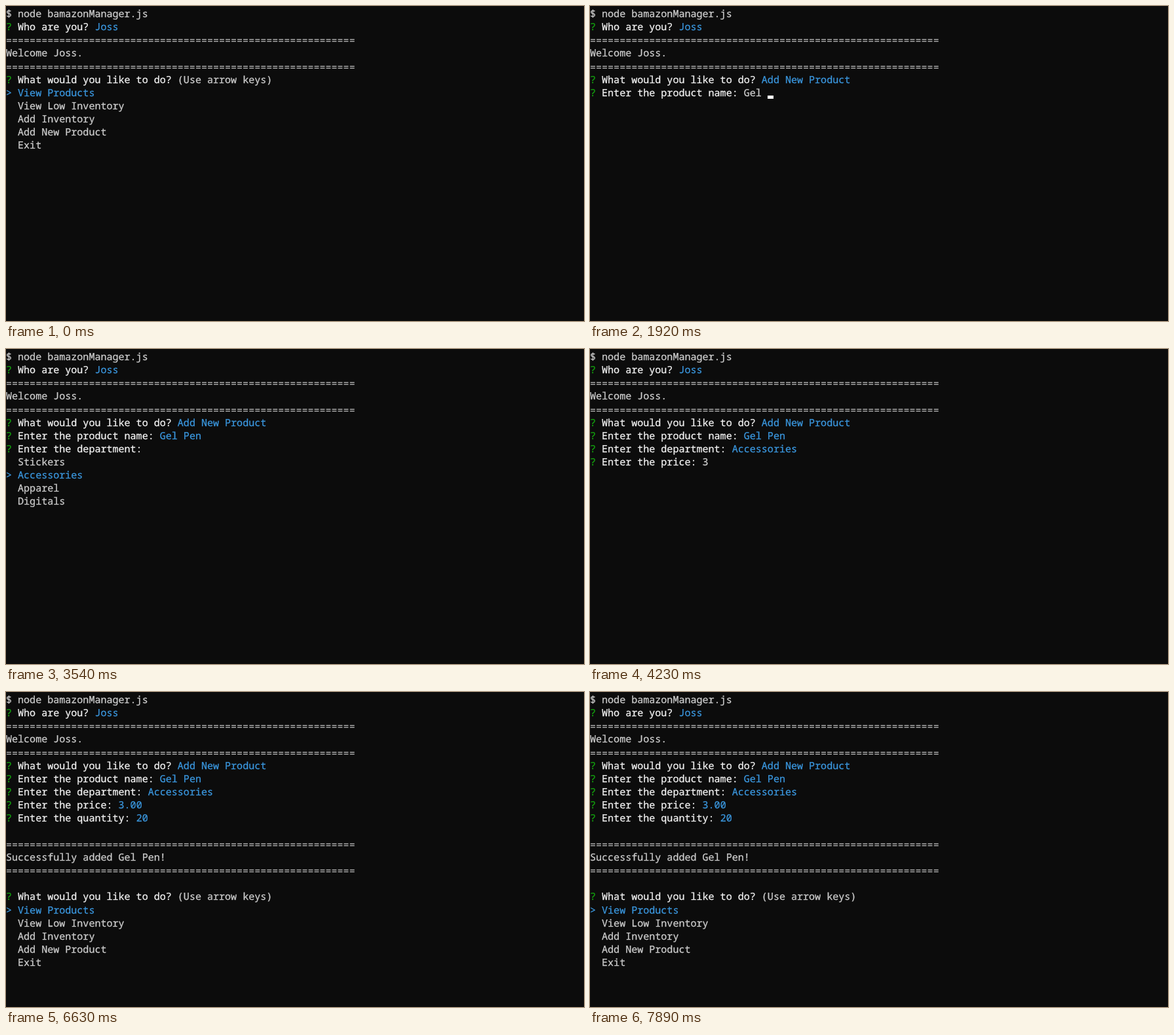
Write an HTML page that moves like this. It is 882 px wide and 482 px high and loops after 7920 ms.

```html
<!DOCTYPE html>
<html lang="en">
<head>
<meta charset="utf-8">
<title>Terminal product manager</title>
<style>
  html, body { margin: 0; width: 100%; height: 100%; overflow: hidden; background: #0c0c0c; }
  svg { display: block; }
  text {
    font: 15.05px "Noto Sans Mono", "DejaVu Sans Mono", monospace;
    text-rendering: geometricPrecision;
    white-space: pre;
  }
  tspan { fill: currentColor; stroke: currentColor; stroke-width: 0.3px; }
  .plain { color: #cccccc; }
  .rule { color: #cccccc; stroke: none; }
  .bold { color: #f2f2f2; }
  .mark { color: #13a10e; }
  .pick { color: #3a96dd; }
</style>
</head>
<body>
<svg id="screen" width="882" height="482" viewBox="0 0 882 482"></svg>
<script>
const LOOP = 7920, COL = 9.03, ROW = 482 / 24;
const screen = document.getElementById('screen');
const USER = 'Joss';
const RULE = [['rule', '='.repeat(59)]];
const HINT = '(Use arrow keys)';
const ACTIONS = ['View Products', 'View Low Inventory', 'Add Inventory', 'Add New Product', 'Exit'];
const DEPARTMENTS = ['Stickers', 'Accessories', 'Apparel', 'Digitals'];

// Key press times in ms
const AT = {
  action: [360, 480, 600], actionDone: 840,
  name: [1560, 1680, 1800, 1890, 2010, 2130, 2250], nameDone: 2460,
  department: [3510], departmentDone: 3780,
  price: [4230, 4680, 4830, 4950], priceDone: 5100,
  quantity: [6090, 6150], quantityDone: 6330
};
const CARET_ON = [[840, 1170], [1560, 1950], [4590, 5370], [5760, 6150]];

const presses = (times, t) => times.filter(at => t >= at).length;
const plain = s => [['plain', s]];
const ask = (question, answer, style = 'pick') =>
  [['mark', '? '], ['bold', question + ' '], [style, answer]];

function menu(question, items, index, moved) {
  return [
    ask(question, moved ? '' : HINT, 'plain'),
    ...items.map((item, i) => [i === index ? ['pick', '> ' + item] : ['plain', '  ' + item]])
  ];
}

function choose(question, items, times, done, t) {
  const index = presses(times, t);
  return t < done ? menu(question, items, index, index > 0)
                  : [ask(question, items[times.length])];
}

function input(question, value, times, done, t) {
  return [t < done ? ask(question, value.slice(0, presses(times, t)), 'plain')
                   : ask(question, value)];
}

function linesAt(t) {
  const todo = 'What would you like to do?';
  const lines = [
    plain('$ node bamazonManager.js'),
    ask('Who are you?', USER),
    RULE, plain(`Welcome ${USER}.`), RULE,
    ...choose(todo, ACTIONS, AT.action, AT.actionDone, t)
  ];
  if (t >= AT.actionDone)
    lines.push(...input('Enter the product name:', 'Gel Pen', AT.name, AT.nameDone, t));
  if (t >= AT.nameDone)
    lines.push(...choose('Enter the department:', DEPARTMENTS, AT.department, AT.departmentDone, t));
  if (t >= AT.departmentDone)
    lines.push(...input('Enter the price:', '3.00', AT.price, AT.priceDone, t));
  if (t >= AT.priceDone)
    lines.push(...input('Enter the quantity:', '20', AT.quantity, AT.quantityDone, t));
  if (t >= AT.quantityDone)
    lines.push([], RULE, plain('Successfully added Gel Pen!'), RULE, [],
      ...menu(todo, ACTIONS, 0, false));
  return lines;
}

const baseline = row => Math.round(17.2 + ROW * row);

function drawLine(parts, row) {
  const spans = parts.map(([style, s]) =>
    `<tspan class="${style}">${s.replace('>', '&gt;')}</tspan>`).join('');
  // Equals signs sit slightly lower than the font draws them
  const y = baseline(row) + (parts === RULE ? 1 : 0);
  return `<text x="0" y="${y}">${spans}</text>`;
}

function drawCaret(lines) {
  const row = lines.length - 1;
  const col = lines[row].reduce((n, [, s]) => n + s.length, 0);
  return `<rect x="${Math.round(col * COL)}" y="${baseline(row) - 1}" width="9" height="5" fill="#fff"/>`;
}

let shown = '';
function render(t) {
  const lines = linesAt(t);
  let markup = lines.map(drawLine).join('');
  if (CARET_ON.some(([on, off]) => t >= on && t < off)) markup += drawCaret(lines);
  if (markup !== shown) screen.innerHTML = shown = markup;
}

const start = performance.now();
function tick() {
  render((performance.now() - start) % LOOP);
  requestAnimationFrame(tick);
}
tick();
</script>
</body>
</html>
```
